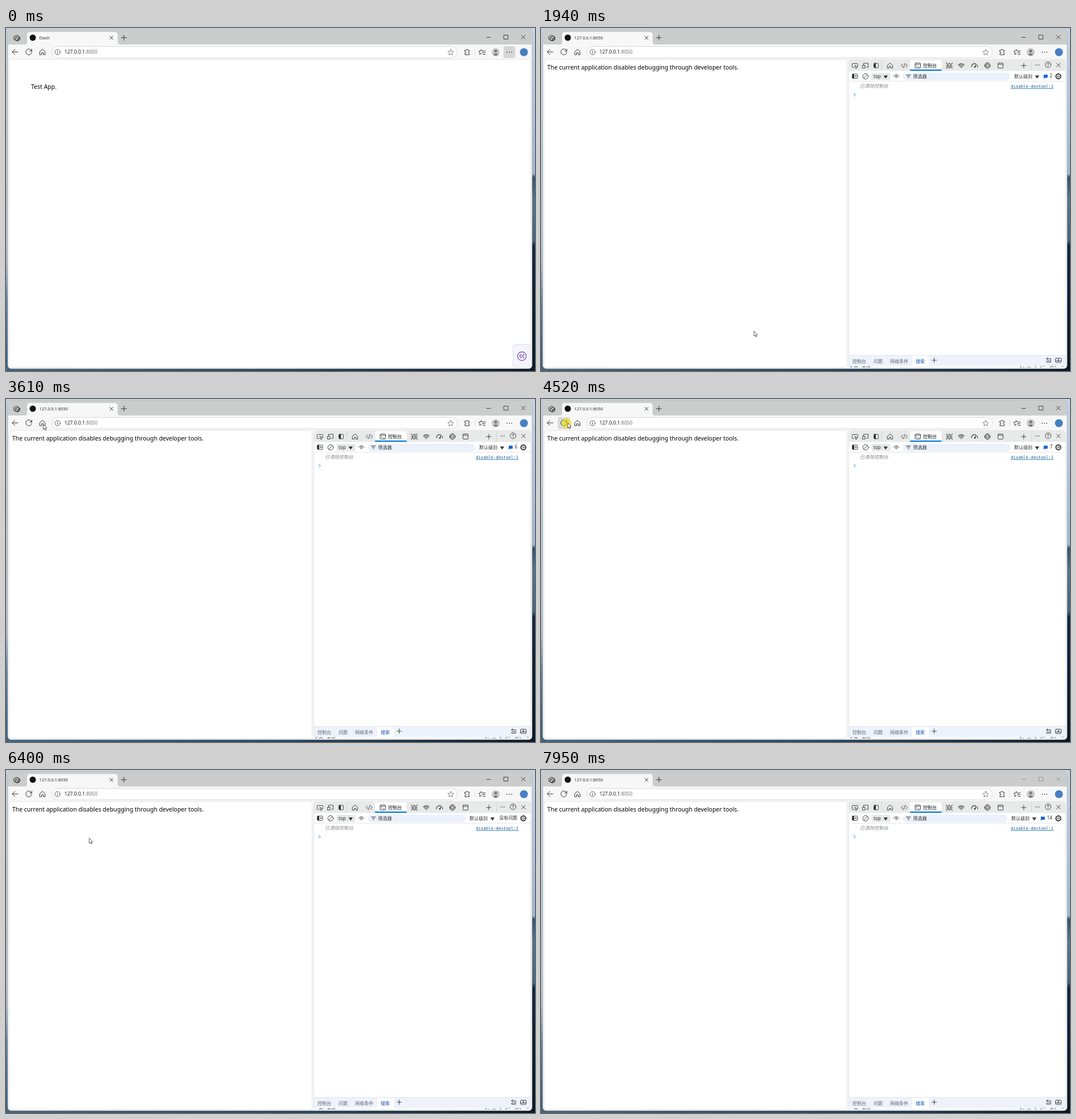
Write an HTML page that moves like this. It is 929x603 px and loops after 8030 ms.

```html
<!DOCTYPE html>
<html lang="en">
<head>
<meta charset="utf-8">
<title>Browser with developer tools</title>
<style>
  html, body { margin: 0; width: 100%; height: 100%; overflow: hidden; background: #c5d0de; }
  svg { display: block; width: 929px; height: 603px; }
  text { font-family: "Noto Sans", "Noto Sans CJK SC", "Noto Sans CJK", sans-serif; font-size: 8px; fill: #2b2b2b; white-space: pre; }
  .page { font-size: 10.43px; fill: #000; }
  .mono { font: 7.33px "DejaVu Sans Mono", monospace; fill: #0b5a94; }
  .icon { fill: none; stroke: #333; stroke-linecap: round; stroke-linejoin: round; }
  .solid { fill: #333; stroke: none; }
  .drawer text { fill: #5f6670; }
</style>
</head>
<body>
<svg viewBox="0 0 929 603" xmlns="http://www.w3.org/2000/svg">
  <defs>
    <linearGradient id="left" x2="0" y2="1">
      <stop stop-color="#c5cfdd"/><stop offset=".68" stop-color="#b3bfce"/>
      <stop offset=".8" stop-color="#64839f"/><stop offset="1" stop-color="#3d5f7e"/>
    </linearGradient>
    <linearGradient id="right" x2="0" y2="1">
      <stop stop-color="#c6d4e7"/><stop offset=".425" stop-color="#9db6d2"/>
      <stop offset=".435" stop-color="#34526c"/><stop offset=".5" stop-color="#55758f"/>
      <stop offset=".62" stop-color="#456581"/><stop offset=".635" stop-color="#10263a"/>
      <stop offset="1" stop-color="#071726"/>
    </linearGradient>
    <linearGradient id="bottom">
      <stop stop-color="#45657f"/><stop offset=".5" stop-color="#2b4b66"/><stop offset="1" stop-color="#091a2a"/>
    </linearGradient>
    <clipPath id="searchRow"><rect x="541" y="594" width="380" height="3"/></clipPath>
  </defs>

  <!-- desktop and window -->
  <rect width="929" height="603" fill="#c6d2e2"/>
  <rect width="8" height="603" fill="url(#left)"/>
  <rect x="920" width="9" height="603" fill="url(#right)"/>
  <rect y="594" width="929" height="9" fill="url(#bottom)"/>
  <rect x="3" y="2.5" width="921" height="596.5" rx="6" fill="#f7f7f7" stroke="#8e9499" stroke-width=".6"/>
  <path d="M3 29V8.500q0-6 6-6H918q6 0 6 6V29Z" fill="#cbcdcd"/>
  <path d="M33 29q4 0 4-4V12q0-5 5-5H191q5 0 5 5V25q0 4 4 4Z" fill="#f7f7f7"/>
  <circle cx="47" cy="17" r="5.500" fill="#111"/>
  <text id="tabTitle" x="58.500" y="19.800"></text>
  <g class="icon">
    <path d="M14 15l4.500-2.500 4.500 2.500v5l-4.500 2.500-4.500-2.500ZM16.500 16.500l4-2.200 4 2.200v4l-4 2.200-4-2.200ZM16.500 16.500l4 2.200 4-2.200M20.500 18.700v4"/>
    <path d="M182.500 14.500l5.500 5.500m0-5.500l-5.500 5.500M202.500 17h9M207 12.500v9"/>
  </g>
  <g id="windowButtons" class="icon" stroke-linecap="butt">
    <path d="M844 16.500h7M874.500 12.500h7v7h-7ZM905 12.500l7 7m0-7l-7 7" style="stroke-width:.9"/>
  </g>

  <!-- toolbar -->
  <rect id="reloadHover" x="29.500" y="32" width="21.500" height="21" rx="3" fill="#d9d9d9"/>
  <rect id="menuHover" x="873.500" y="32" width="21" height="21" rx="3" fill="#d6d6d6"/>
  <rect x="80.500" y="32.500" width="712" height="20" rx="10" fill="#fff" stroke="#d8d8d8"/>
  <text x="102.500" y="45.400" style="font-size:8.55px;fill:#222">127.0.0.1<tspan fill="#707070">:8050</tspan></text>
  <g class="icon">
    <path d="M21 42H11m4.500-4.500L11 42l4.500 4.500"/>
    <path d="M45 40.200A5.200 5.200 0 1 0 45.300 42.500M45.300 37v3.500h-3.500"/>
    <path d="M59.500 41.500l4.500-4 4.500 4v5.500h-3v-3.500h-3V47h-3Z"/>
    <circle cx="90.500" cy="42.500" r="4.600" stroke-width=".8"/>
    <path d="M90.500 42v2.500m0-4.500v.1" stroke-width=".9"/>
    <path id="star" stroke="#666" stroke-width=".8" d="M781 37.500l1.500 3.400 3.700.4-2.800 2.500.8 3.600-3.200-1.900-3.200 1.900.8-3.600-2.800-2.500 3.700-.4Z"/>
    <path d="M806 39h2.300a1.500 1.500 0 0 1 3 0h2.200v2.300a1.500 1.500 0 0 0 0 3V47h-7.500v-2.500a1.500 1.500 0 0 0 0-3Z"/>
    <path d="M823.500 38v9" stroke="#ddd"/>
    <path d="M837.500 40.700l-1.500-.1-1.400-3-1.500 3-3 .4 2.300 2.200-.6 3.300 3-1.500M838 40.500h4M836.500 43.500h5M838 46.500h3.500"/>
    <circle cx="860" cy="42.500" r="7" fill="#c9c7c5" stroke="none"/>
    <path d="M855.700 46.500q4.300-3.500 8.600 0-4.300 4.300-8.600 0Z" fill="#777" stroke="none"/>
    <circle cx="860" cy="40.500" r="2.500" fill="#777" stroke="none"/>
    <path d="M880 42.500h.1m3.900 0h.1m3.900 0h.1" stroke-width="1.700"/>
  </g>
  <circle cx="909.500" cy="42.500" r="7" fill="#477fc4"/>

  <!-- page -->
  <rect id="pageBox" x="5.500" y="55.500" height="541" rx="5" fill="#fff" stroke="#e6e6e6"/>
  <text id="pageText" class="page"></text>
  <g id="debugButton">
    <path d="M890.500 596V560q0-3.500 3.500-3.500h27V596Z" fill="#f4f4fb"/>
    <path d="M890.500 596V560q0-3.500 3.500-3.500h27" fill="none" stroke="#dcdce8"/>
    <g class="icon" style="stroke:#7047ad;stroke-width:1.25">
      <circle cx="906" cy="577" r="7.600"/>
      <path d="M905 574l-3 3 3 3m4.500-6l-3 3 3 3"/>
    </g>
  </g>

  <!-- developer tools -->
  <g id="panel">
    <rect x="540.500" y="55.500" width="381" height="541" rx="4" fill="#fff" stroke="#e4e4e4"/>
    <g id="tabs">
      <path d="M541 75.500V60q0-4 4-4H917q4 0 4 4V75.500Z" fill="#e8e9e9"/>
      <rect x="648" y="56.500" width="55.500" height="19" fill="#fff"/>
      <rect x="648" y="73" width="55.500" height="2.200" fill="#0078d4"/>
      <path d="M598.500 57v17M861.500 57v17" stroke="#d4d5d5"/>
      <text x="671" y="69" style="fill:#111">控制台</text>
      <g class="icon" stroke-width=".9">
        <path d="M550 69.500h-2.500q-1 0-1-1v-5q0-1 1-1h8q1 0 1 1v2.500M551.500 66l5 2-2.200 1-.8 2.200Z"/>
        <path d="M566.500 65v-3h8v7h-3M565 65.500h4v5h-4Z"/>
        <rect x="584.500" y="62" width="8" height="8" rx="1.500"/><path class="solid" d="M585 62h3v8h-3Z"/>
        <path d="M608.500 65.500l4.500-4 4.500 4v5h-3v-3h-3v3h-3Z"/>
        <path d="M635.500 63l-3 3 3 3m5-6l3 3-3 3m-1-7l-3 8"/>
        <rect x="657" y="61.500" width="9.500" height="9" rx="1.500"/><path d="M657 63.800h9.500M659 65.500l1.500 1.400-1.500 1.400m3.500.2h2"/>
        <rect x="714.500" y="62" width="5" height="8.500" rx="2.500"/>
        <path d="M712 61v2l2.500 1.300M722 61v2l-2.500 1.300M711.500 66.500h3m5 0h3M712 71.500v-2l2.500-1M722 71.500v-2l-2.500-1M717 64v5"/>
        <path d="M733 65q5-4.300 10 0m-8.500 1.800q3.500-3 7 0m-5.300 1.700q1.800-1.500 3.600 0m-1.800 1.500v.1" stroke-width="1.100"/>
        <path d="M756 68.500a5.200 5.200 0 0 1 8-5m1.800 1.500q1 1.500.9 3.500M761 68.700l3-3.700-2 4.500Z" stroke-width="1.100"/>
        <circle cx="784" cy="66" r="4.500" stroke-width="1.200"/><rect x="782" y="64" width="4" height="4"/>
        <path d="M784 60.500v1m0 9v1m-5.500-5.500h1m9 0h1"/>
        <rect x="802.500" y="61.500" width="9" height="9" rx="1.500"/><path d="M802.500 64h9"/>
        <path d="M843.500 66h8.500m-4.200-4.200v8.500M905.500 62l6.500 6.500m0-6.500l-6.500 6.500"/>
        <path d="M869 65h.1m2.900 0h.1m2.900 0h.1" stroke-width="1.400"/>
        <circle cx="890.500" cy="64.500" r="5"/><path d="M889 63.500q0-1.800 1.700-1.700 1.700.2 1.300 1.500l-1.500 1.500v.5m0 1.600v.1"/>
      </g>
    </g>
    <g id="filters">
      <path d="M541 93.500H921" stroke="#e3e5e8"/>
      <rect x="580.500" y="79" width="33" height="12.500" rx="1" fill="#e7e8e9"/>
      <text x="584" y="88">top</text>
      <path class="solid" d="M601.500 83.500h7.500l-3.700 5.500Z"/>
      <rect id="filterBox" x="635.500" y="78.500" height="13.500" rx="6.500" fill="#ebf1fb"/>
      <text x="653.500" y="88">筛选器</text>
      <g id="level"><text x="814" y="87.700">默认级别</text><path class="solid" d="M850.500 83.500h7.500l-3.700 5.500Z"/></g>
      <text id="noIssues" x="866" y="87.300">没有问题</text>
      <g id="issues">
        <path d="M866.200 82h5.600q1 0 1 1v3.500q0 1-1 1h-4l-2 1.500V83Z" fill="#1064d8"/>
        <text id="issueCount" x="876.500" y="87.300"></text>
      </g>
      <g class="icon" stroke-width=".9">
        <rect x="546.500" y="81" width="9.500" height="7.500" rx="1"/><path class="solid" d="M547 81h3v7.500h-3Z"/><path d="M551 84.700h3m-1.300-1.300l1.300 1.300-1.300 1.300"/>
        <circle cx="570" cy="85" r="4.800"/><path d="M566.700 88.300l6.600-6.600"/>
        <path d="M619 85q5-6 10 0"/><circle cx="624" cy="85.700" r="1.700"/>
        <path d="M641.500 82.500h7.500m-6 2.300h4.500m-3.200 2.300h1.900"/>
        <circle cx="908.500" cy="85" r="4.600" stroke-width="1.300" stroke-dasharray="2.600 1"/><circle cx="908.500" cy="85" r="3.700"/><circle cx="908.500" cy="85" r="1.400"/>
      </g>
    </g>
    <g id="message">
      <text x="560" y="105.300" style="font-size:8.300px;font-style:italic;fill:#858585">已清除控制台</text>
      <text class="mono" x="825" y="105" text-decoration="underline">disable-devtool:1</text>
    </g>
    <path id="prompt" class="icon" d="M549.500 97.500l2.700 2.700-2.700 2.700" style="stroke:#2586cf"/>
    <g id="drawer" class="drawer">
      <rect x="541" y="575" width="380" height="19" fill="#edf2fb"/>
      <path d="M541 575.500H921" stroke="#dfe5ef"/>
      <rect x="652" y="576.500" width="29" height="18" fill="#fff"/>
      <text x="547" y="588.500">控制台</text>
      <text x="584" y="588.500">问题</text>
      <text x="613" y="588.500">网络条件</text>
      <text x="658" y="588.500" style="fill:#0b4fb3;font-weight:500">搜索</text>
      <g class="icon" stroke-width=".9">
        <path d="M686.500 584h8m-4-4v8"/>
        <path d="M888 581.500h7v6h-7v-2m2-6l-2.500 2 2.500 2M889.500 585h4"/>
        <rect x="903.500" y="580.500" width="10" height="7.500" rx="1.500"/><path d="M904 585.500h9m-4.500-3.500v2.500m-1.200-1.200l1.200 1.200 1.200-1.200"/>
      </g>
      <g clip-path="url(#searchRow)">
        <path id="focusArc" d="M546.500 594q-3 1-2.500 4" fill="none" stroke="#0b57d0"/>
        <circle cx="553" cy="598" r="3" fill="none" stroke="#555"/>
        <text x="563" y="601">查找</text>
        <text x="840" y="601">Aa ab</text>
        <path class="icon" d="M867 594l3 3M877 597l3-3m2 0h3M894 597l3-3 3 3m2-3l2 2M914 594h4" style="stroke:#555"/>
      </g>
    </g>
  </g>

  <!-- pointer -->
  <circle id="click" cx="45" cy="43" r="9" fill="#f4e400" fill-opacity=".6"/>
  <path id="cursor" d="M0 0V9l2-1.800 1.500 3.100 1.500-.7-1.500-3 2.900-.2Z" fill="#fff" stroke="#333" stroke-width=".8"/>
</svg>
<script>
const LOOP = 8030;
const el = Object.fromEntries([...document.querySelectorAll('[id]')].map(node => [node.id, node]));

// [start time, value]
const pages = [[0, 'app'], [1410, 'blocked'], [4570, 'blank'], [4660, 'app'], [5330, 'blocked']];
const issues = [[0, 0], [1650, 2], [2140, 5], [2630, 6], [4120, 7], [4610, 0], [7420, 13], [7750, 14]];
// [start, end]
const cleared = [[610, 700], [1160, 1190], [1650, 1690], [2140, 2190], [2630, 2670], [3130, 3170], [3620, 3660],
  [4120, 4170], [4610, 4800], [5330, 5370], [5810, 5850], [6290, 6330], [6780, 6820], [7260, 7310]];
// [time, x, y]
const moves = [[1850, 400, 604], [2200, 300, 330], [2750, 171, 99.5], [3040, 110, 52], [3400, 78, 46],
  [3850, 51, 43], [3980, 47, 42], [4520, 47, 42], [4700, 47, 44.5], [5960, 47, 44.5], [6160, 88, 46],
  [6500, 170, 150], [6920, 353, 395], [7060, 505, 605]];

const content = {
  app: { title: 'Dash', text: 'Test App.', x: 44, y: 106.5 },
  blank: { title: '127.0.0.1:8050', text: '', x: 11, y: 73 },
  blocked: { title: '127.0.0.1:8050', text: 'The current application disables debugging through developer tools.', x: 11, y: 73 }
};

const valueAt = (steps, t) => steps.findLast(([start]) => start <= t)[1];
const within = (t, start, end) => t >= start && t < end;
const show = (node, on) => { node.style.display = on ? '' : 'none'; };
const shift = (node, x, y = 0) => node.setAttribute('transform', `translate(${x} ${y})`);

function drawPage(t) {
  const docked = t >= 210;
  const { title, text, x, y } = content[valueAt(pages, t)];
  el.tabTitle.textContent = title;
  el.tabTitle.style.fontSize = title === 'Dash' ? '7.6px' : '7.4px';
  el.pageText.textContent = text;
  el.pageText.setAttribute('x', x);
  el.pageText.setAttribute('y', y);
  el.pageBox.setAttribute('width', docked ? 532 : 916);
  shift(el.debugButton, docked ? -384 : 0);
  show(el.debugButton, title === 'Dash');
}

function drawTools(t) {
  show(el.panel, t >= 210);
  show(el.tabs, t >= 300);
  show(el.drawer, t >= 430);
  show(el.filters, t >= 430);
  const empty = cleared.some(([start, end]) => within(t, start, end));
  show(el.message, t >= 610 && !empty);
  show(el.prompt, t >= 610);
  shift(el.prompt, 0, empty ? 0 : 17);
  el.prompt.style.opacity = empty ? 0.75 : 1;
  show(el.focusArc, t < 5330);

  const count = valueAt(issues, t);
  const slack = count === 0 ? 0 : count < 10 ? 17 : 12;
  el.filterBox.setAttribute('width', 171.5 + slack);
  el.issueCount.textContent = count;
  shift(el.level, slack);
  shift(el.issues, slack);
  show(el.noIssues, !count);
  show(el.issues, count);
}

function drawPointer(t) {
  const next = moves.findIndex(([time]) => time > t);
  show(el.cursor, next > 0);
  if (next > 0) {
    const [t0, x0, y0] = moves[next - 1], [t1, x1, y1] = moves[next];
    const k = (t - t0) / (t1 - t0);
    shift(el.cursor, x0 + (x1 - x0) * k, y0 + (y1 - y0) * k);
  }
  show(el.click, within(t, 4440, 4570));
  show(el.reloadHover, within(t, 4390, 6000));
  show(el.menuHover, t < 30);
}

function draw(t) {
  drawPage(t);
  drawTools(t);
  drawPointer(t);
  el.windowButtons.style.opacity = t >= 7750 ? 0.4 : 1;
}

const begin = performance.now();
function tick() {
  draw((performance.now() - begin) % LOOP);
  requestAnimationFrame(tick);
}
tick();
</script>
</body>
</html>
```
